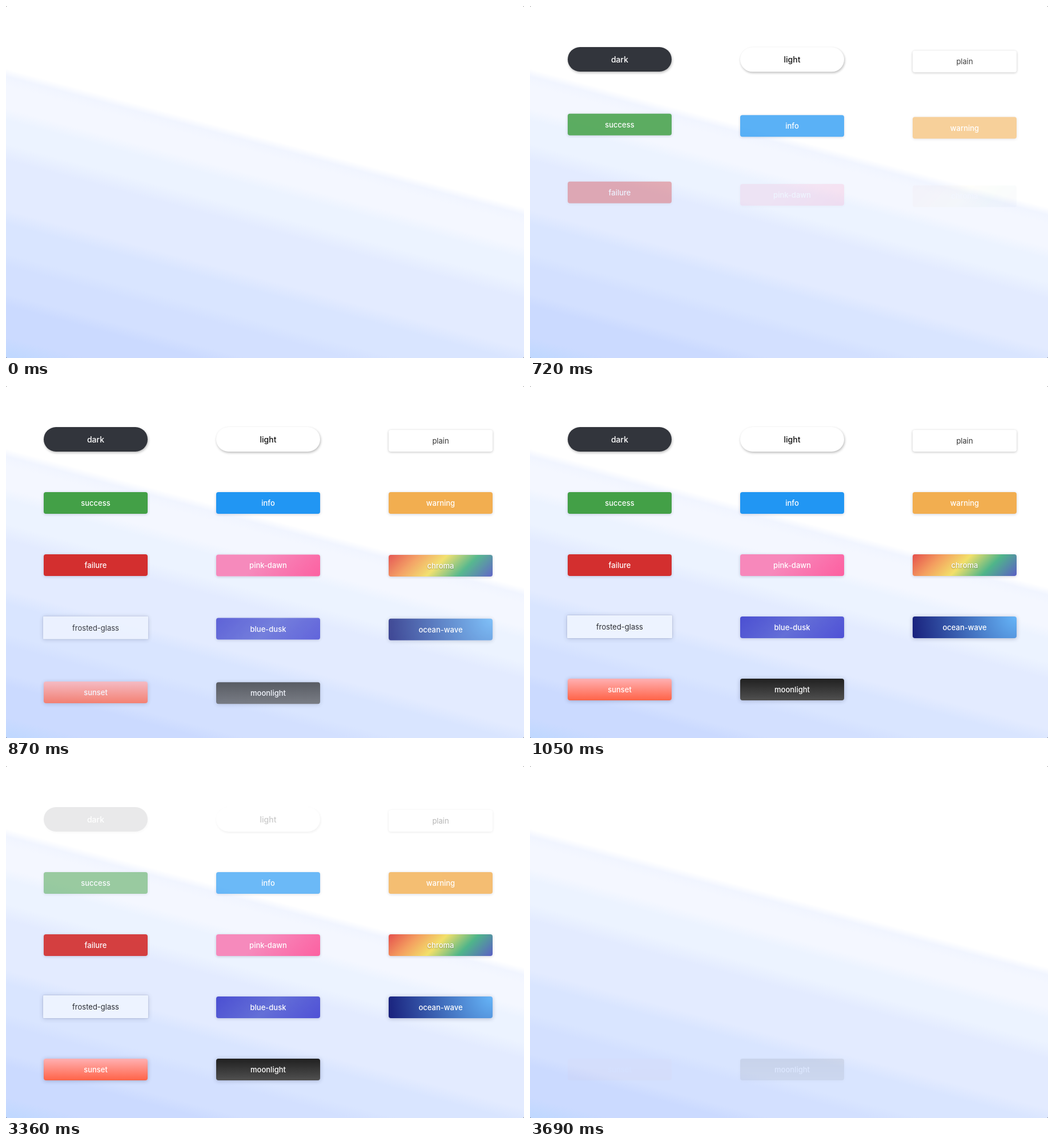
Write an HTML page that moves like this. It is 907 by 617 pixels and loops after 3810 ms.

```html
<!DOCTYPE html>
<html lang="en">
<head>
<meta charset="utf-8">
<title>Button themes</title>
<style>
  html, body { margin: 0; width: 100%; height: 100%; overflow: hidden; background: #555; }
  #stage {
    position: relative; width: 907px; height: 617px; overflow: hidden; border-radius: 2px;
    background: linear-gradient(195deg, #fff 341px, #f1f5ff 354px, #f4f7ff 370px 408px,
      #ecf3ff 428px 468px, #e3ebff 496px 580px, #d9e5ff 604px 654px,
      #d3e0ff 675px 722px, #cbdaff 742px 795px, #c0d8ff 825px);
  }
  .button {
    position: absolute; box-sizing: border-box; width: 182px; height: 38px; line-height: 38px;
    border-radius: 4px; text-align: center; color: #fff;
    font: 500 13px/38px Inter, "Open Sans", sans-serif;
    box-shadow: 0 1px 5px rgba(40, 50, 90, .22);
  }
  .dark, .light { height: 43px; border-radius: 22px; font-size: 14px; line-height: 43px;
    box-shadow: 1px 2px 4px rgba(0, 0, 0, .28); }
  .dark { background: #32353c; }
  .light { background: #fff; color: #111; }
  .plain { background: #fff; color: #333; font-weight: 400; box-shadow: 0 1px 4px rgba(0, 0, 0, .24); }
  .success { background: #43a047; }
  .info { background: #2196f3; }
  .warning { background: #f2ae50; }
  .failure { background: #d32f2f; }
  .pink-dawn { background: linear-gradient(135deg, #f788bb 40%, #fd5fa0); }
  .chroma { background: linear-gradient(135deg, #e5504c, #f4a060 25%, #f2e06a 47%, #4fb58a 72%, #5c5fc6);
    text-shadow: 0 1px 2px rgba(0, 0, 0, .35); }
  .frosted-glass { width: 184px; height: 40px; line-height: 40px; border-radius: 1px;
    background: #edf3ff; color: #2b2d33; font-weight: 400;
    box-shadow: 0 0 2px rgba(40, 50, 90, .3), 0 1px 8px rgba(40, 50, 90, .2); }
  .blue-dusk { background: linear-gradient(135deg, #4b4fd2, #646fd7 50%, #4f51d6); }
  .ocean-wave { background: radial-gradient(circle at 100% 0, #66b5f8, #1a237e 183px); }
  .sunset { background: linear-gradient(#ffb0b2, #ff6347); }
  .moonlight { background: linear-gradient(#202020, #505050); }
  .sunset, .moonlight, .ocean-wave { box-shadow: 0 1px 7px rgba(40, 50, 90, .3); }
</style>
</head>
<body>
<div id="stage"></div>
<script>
const LOOP = 3810, STEP = 30, LAST_CHANGE = 3690;
const ENTER = { start: 508, duration: 217, rise: 20 };
const LEAVE = { start: 3162, duration: 250, stagger: 25 };
const names = ['dark', 'light', 'plain', 'success', 'info', 'warning', 'failure', 'pink-dawn',
  'chroma', 'frosted-glass', 'blue-dusk', 'ocean-wave', 'sunset', 'moonlight'];
const tops = { dark: 72, light: 72, plain: 77 };

const buttons = names.map((name, i) => {
  const el = document.createElement('div');
  const inset = name === 'frosted-glass' ? 1 : 0;
  el.className = 'button ' + name;
  el.textContent = name;
  el.style.left = 66 + 302 * (i % 3) - inset + 'px';
  el.style.top = (tops[name] || 77 + 109 * Math.floor(i / 3)) - 2 * inset + 'px';
  document.getElementById('stage').append(el);
  return el;
});

const clamp = v => Math.min(1, Math.max(0, v));
const bezier = (a, b, s) => 3 * (1 - s) ** 2 * s * a + 3 * (1 - s) * s * s * b + s ** 3;

// cubic-bezier(.25, .1, .25, 1)
function ease(u) {
  let lo = 0, hi = 1;
  for (let k = 0; k < 20; k++) {
    const mid = (lo + hi) / 2;
    if (bezier(.25, .25, mid) < u) lo = mid; else hi = mid;
  }
  return bezier(.1, 1, lo);
}
const easeInOut = u => (1 - Math.cos(Math.PI * u)) / 2;

function render(time) {
  const t = Math.min(LAST_CHANGE, Math.floor((time % LOOP) / STEP) * STEP);
  buttons.forEach((el, i) => {
    // Entrances follow each other ever more closely
    const delay = 32.3 * i - .865 * i * i;
    const shown = ease(clamp((t - ENTER.start - delay) / ENTER.duration));
    const gone = easeInOut(clamp((t - LEAVE.start - LEAVE.stagger * i) / LEAVE.duration));
    const visible = t < ENTER.start + delay ? 0 : shown * (1 - gone);
    el.style.opacity = visible;
    el.style.transform = shown > .999 ? 'none' : `translateY(${ENTER.rise * (1 - shown)}px)`;
  });
}

const began = performance.now();
(function frame() {
  render(performance.now() - began);
  requestAnimationFrame(frame);
})();
</script>
</body>
</html>
```
